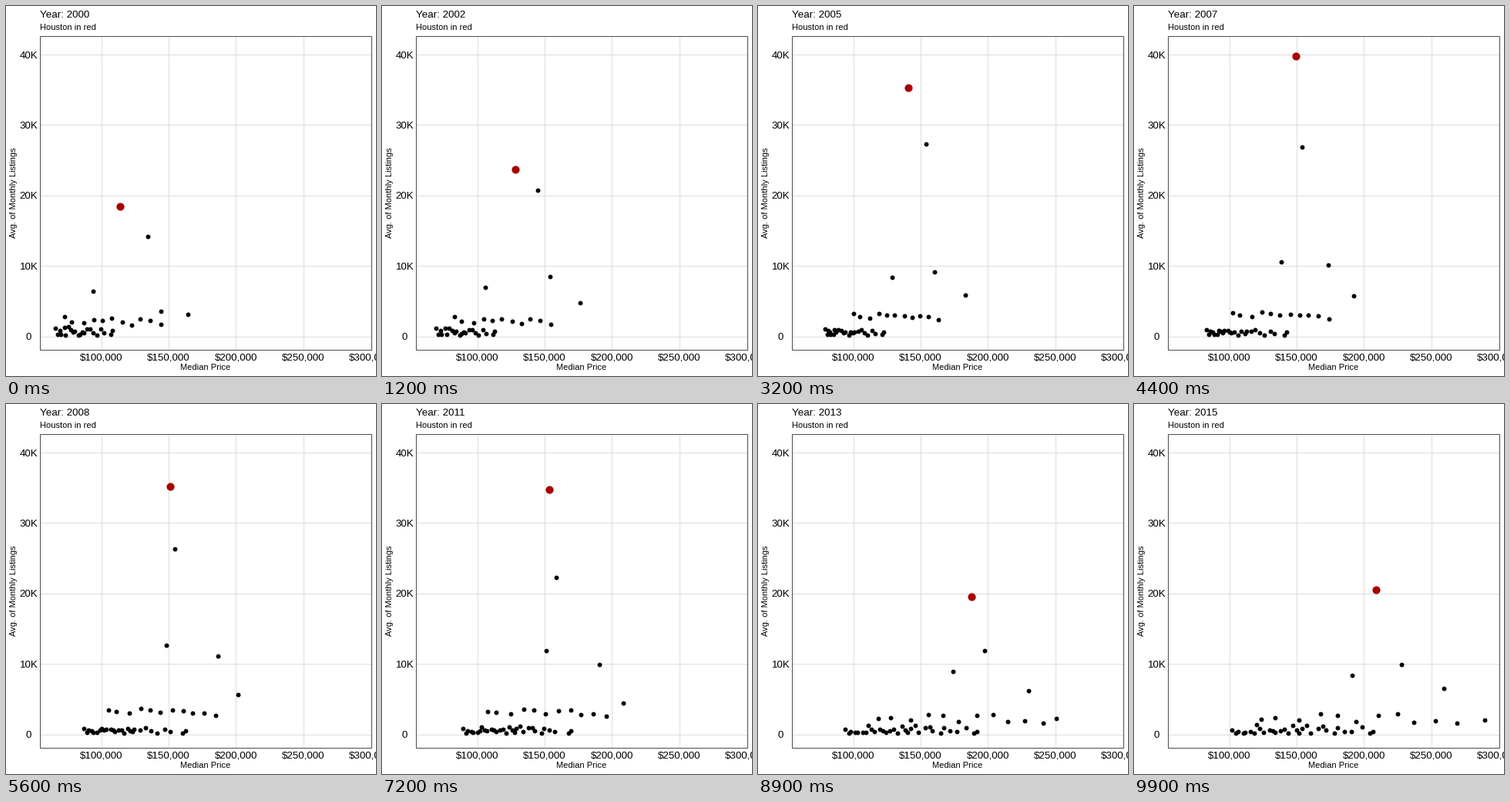
Animation of 480x480 px, one loop 10000 ms. Source, as a matplotlib script:

```python
import matplotlib.pyplot as plt
import numpy as np
from matplotlib.animation import FuncAnimation
from matplotlib.patches import Rectangle

SIZE, DPI = 480, 100
FRAMES, INTERVAL = 100, 100
PX = 72 / DPI  # points per pixel
LEFT, RIGHT, TOP, BOTTOM = 44, 474, 39, 446

plt.rcParams["font.family"] = "Liberation Sans"
rng = np.random.default_rng(14)

# The five largest markets: (frame, x, y) turning points.
HOUSTON = [(0, 148, 260), (12, 173, 211.5), (32, 194.5, 106), (46, 213, 58),
           (56, 213, 106.5), (72, 216.5, 110.5), (89, 276.5, 249.5), (99, 314, 240.5)]
DALLAS = [(0, 183.5, 299), (12, 201.5, 238.5), (32, 217.5, 178.5),
          (56, 219, 188), (72, 225.5, 225), (89, 293.5, 319.5), (99, 346.5, 337.5)]
SAN_ANTONIO = [(0, 112.5, 370), (12, 133.5, 364.5), (32, 174, 351.5),
               (56, 207.5, 312.5), (72, 213, 319.5), (89, 252.5, 346.5), (99, 282.5, 352)]
AUSTIN = [(0, 201, 395.5), (12, 218, 350.5), (32, 229, 345),
          (56, 275, 326.5), (72, 281.5, 337.5), (89, 351, 372), (99, 402, 369)]
COLLIN = [(0, 236, 400), (12, 256.5, 384.5), (32, 268.5, 375),
          (56, 300.5, 376.5), (72, 312.5, 387.5), (89, 387, 408), (99, 455, 409.5)]

# How the cheapest price, the price spread and the listings of a group develop.
KEYS = [0, 12, 32, 56, 72, 89, 99]
MID_LOW = [74, 92, 122, 130, 134, 152, 160]
MID_SPAN = [125, 125, 110, 140, 155, 215, 255]
MID_LIFT = [0, 0, 6, 9, 8, 0, 0]
SMALL_LOW = [64, 70, 87, 100, 104, 112, 126]
SMALL_SPAN = [60, 62, 62, 108, 115, 140, 150]

MIDS, SMALLS = 11, 32
mid_rank = np.linspace(0, 1, MIDS) + rng.uniform(-0.03, 0.03, MIDS)
mid_y = 408 + rng.uniform(-6, 6, (2, MIDS))

rank = (np.arange(SMALLS) + rng.uniform(-0.4, 0.4, SMALLS)) / (SMALLS - 1)
small_shape = rank + 0.25 * np.clip(rank, 0, 1) ** 6
small_y = 427 - 11 * rng.random((2, SMALLS)) ** 1.4
# Every third small market joins later, one after another.
k = np.arange(SMALLS)
entry = np.where(k % 3 == 2, 20 + 2 * k, 0)


def at(i, values):
    return np.interp(i, KEYS, values)


def follow(i, track):
    t, x, y = zip(*track)
    return np.interp(i, t, x), np.interp(i, t, y)


def drift(i, ends):
    return ends[0] + (ends[1] - ends[0]) * i / (FRAMES - 1)


def market_points(i):
    large = np.array([follow(i, t) for t in (DALLAS, SAN_ANTONIO, AUSTIN, COLLIN)])
    mid = np.column_stack([at(i, MID_LOW) + at(i, MID_SPAN) * mid_rank,
                           drift(i, mid_y) - at(i, MID_LIFT)])
    small = np.column_stack([at(i, SMALL_LOW) + at(i, SMALL_SPAN) * small_shape,
                             drift(i, small_y)])
    return np.vstack([large, mid, small[entry <= i]])


fig = plt.figure(figsize=(SIZE / DPI, SIZE / DPI), dpi=DPI, facecolor="white")
ax = fig.add_axes([0, 0, 1, 1])
ax.set(xlim=(0, SIZE), ylim=(SIZE, 0))
ax.axis("off")


def label(x, y, text, px, **kw):
    return ax.text(x, y, text, fontsize=px * PX, color="black", **kw)


def dots(diameter, color, z):
    return ax.scatter([], [], s=(diameter * PX) ** 2, c=color,
                      linewidths=0, zorder=z, snap=False)


grid = dict(color="#dadada", lw=0.9 * PX, zorder=1)
for n in range(5):
    x, y = 124 + 87.2 * n, 428.6 - 91.4 * n
    if x < RIGHT - 10:
        ax.plot([x, x], [TOP, BOTTOM], **grid)
    ax.plot([LEFT, RIGHT], [y, y], **grid)
    label(x, 459.6, f"\\${100 + 50 * n},000", 13.33, ha="center")
    label(29.5, y + 4.5, f"{10 * n}K" if n else "0", 13.33, ha="center")

ax.add_patch(Rectangle((LEFT, TOP), RIGHT - LEFT, BOTTOM - TOP, fill=False,
                       ec="#4d4d4d", lw=PX, zorder=5))

title = label(43.7, 15, "", 13.33)
label(43.7, 31, "Houston in red", 11.1)
label(259, 471.6, "Median Price", 11.1, ha="center")
label(13.5, 242.5, "Avg. of Monthly Listings", 11.1, rotation=90,
      ha="center", va="baseline", rotation_mode="anchor")

others = dots(5.9, "black", 3)
houston = dots(10.2, "#a90000", 4)


def update(i):
    houston.set_offsets([follow(i, HOUSTON)])
    others.set_offsets(market_points(i))
    title.set_text(f"Year: {round(2000 + 15 * i / (FRAMES - 1))}")
    return houston, others, title


anim = FuncAnimation(fig, update, frames=FRAMES, interval=INTERVAL,
                     repeat=True, repeat_delay=0, blit=False)
plt.show()
```
